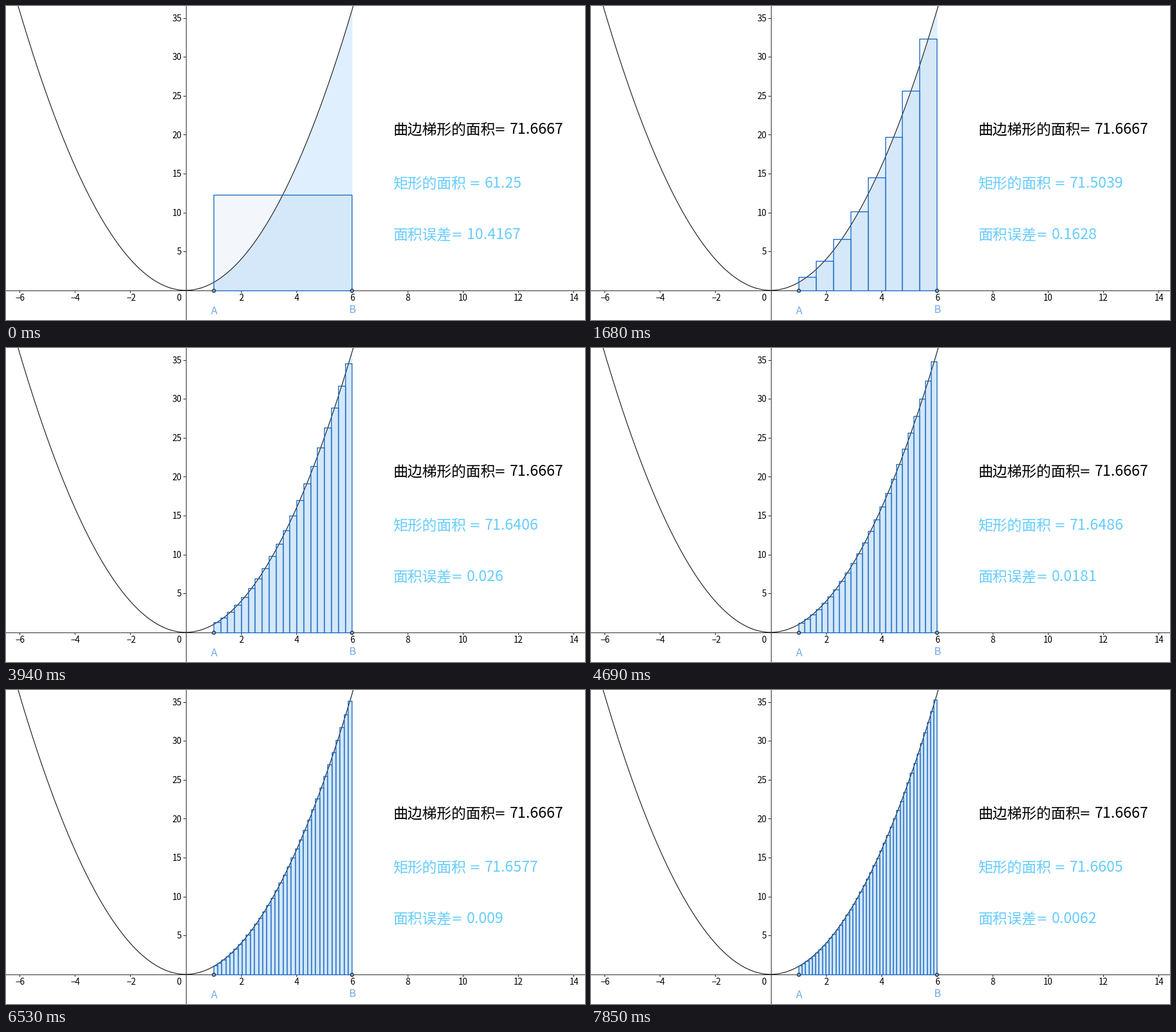
Animation, 901 px wide and 489 px high, one loop 8000 ms. Source, as a matplotlib script:

```python
import numpy as np
import matplotlib.pyplot as plt
from matplotlib.animation import FuncAnimation
from matplotlib.collections import PolyCollection

WIDTH, HEIGHT, DPI = 901, 489, 100
LOOP_MS, STEP_MS = 8000, 20
PX = 72 / DPI

X0, Y0 = 279.6, 442.8           # pixel position of the graph's zero point
X_UNIT, Y_UNIT = 43.13, 12.12   # pixels per unit
LOW, HIGH = 1, 6
EXACT = (HIGH**3 - LOW**3) / 3

BLUE, SKY, PALE = "#1565C0", "#66CCFF", "#DFEFFE"
FONT = "Noto Sans CJK JP"

# Moments at which one more rectangle is added.
CHANGES = np.array([
    500, 670, 920, 1090, 1260, 1510, 1680, 1840, 2010, 2260,
    2420, 2590, 2760, 2920, 3190, 3350, 3520, 3770, 3930, 4100,
    4350, 4520, 4690, 4860, 5020, 5180, 5450, 5610, 5780, 5950,
    6200, 6360, 6530, 6690, 6940, 7110, 7280, 7440, 7690, 7850])

# The small surplus keeps the pixel size from being rounded down.
fig = plt.figure(figsize=((WIDTH + 0.01) / DPI, (HEIGHT + 0.01) / DPI), dpi=DPI,
                 facecolor="white")
ax = fig.add_axes([0, 0, 1, 1])
ax.set_xlim(0, WIDTH)
ax.set_ylim(HEIGHT, 0)
ax.axis("off")


def px(x):
    return X0 + X_UNIT * x


def py(y):
    return Y0 - Y_UNIT * y


def line(xs, ys, color="#303030", width=1.0, z=3):
    ax.plot(xs, ys, color=color, lw=width * PX, zorder=z)


def write(x, y, text, size, color="black", ha="left", font=FONT):
    return ax.text(x, y, text, fontsize=size * PX, color=color, ha=ha,
                   va="baseline", family=font, zorder=6)


def draw_axes():
    line([0, WIDTH], [Y0, Y0])
    line([X0, X0], [0, HEIGHT])
    for x in range(-6, 15, 2):
        if x:
            line([px(x)] * 2, [Y0, Y0 + 3.5])
            shift = 1.2 if x < 0 else 0.6
            write(px(x) + shift, 459.3, str(x).replace("-", "\u2212"), 13.5, ha="center")
    write(269, 459.3, "0", 13.5, ha="center")
    for y in range(5, 36, 5):
        line([X0 - 3.5, X0], [py(y)] * 2)
        write(273.5, py(y) + 5.2, str(y), 13.5, ha="right")


def draw_curve():
    x = np.linspace(-6.3, 6.3, 400)
    line(px(x), py(x**2), "#222222", 1.2, 2)
    x = np.linspace(LOW, HIGH, 120)
    ax.fill_between(px(x), py(x**2), Y0, color=PALE, lw=0, zorder=1)


def draw_points():
    for x, name, label_x, base in ((LOW, "A", 323.8, 480), (HIGH, "B", 539.2, 478)):
        ax.plot(px(x), Y0, "o", ms=5 * PX, mfc="#7FAEDD", mec="#16212E",
                mew=1.2 * PX, zorder=5)
        write(label_x, base, name, 16.5, "#74A9E6", "center")


def readout(label, x, base, equals_x, value_x, color):
    write(x, base, label, 22.8, color)
    write(equals_x, base, "=", 21, color, "center", "DejaVu Sans")
    return write(value_x, base, "", 23.2, color)


def short(value):
    return f"{value:.4f}".rstrip("0").rstrip(".")


draw_axes()
draw_curve()
draw_points()
exact_text = readout("曲边梯形的面积", 602.5, 199.3, 769, 784, "black")
sum_text = readout("矩形的面积", 602.5, 283.3, 730, 745, SKY)
error_text = readout("面积误差", 602.8, 363.3, 702, 717, SKY)
exact_text.set_text(short(EXACT))

bars = PolyCollection([], facecolors=[(0.08, 0.4, 0.75, 0.05)], edgecolors=BLUE,
                      linewidths=1.3 * PX, zorder=4)
ax.add_collection(bars, autolim=False)


def update(frame):
    now = frame * STEP_MS + STEP_MS / 2
    count = 1 + np.searchsorted(CHANGES, now, side="right")
    edges = np.linspace(LOW, HIGH, count + 1)
    heights = ((edges[:-1] + edges[1:]) / 2) ** 2
    bars.set_verts([
        [(px(a), Y0), (px(a), py(h)), (px(b), py(h)), (px(b), Y0)]
        for a, b, h in zip(edges[:-1], edges[1:], heights)])
    total = heights.sum() * (HIGH - LOW) / count
    sum_text.set_text(short(total))
    error_text.set_text(short(EXACT - total))
    return bars, sum_text, error_text


animation = FuncAnimation(fig, update, frames=LOOP_MS // STEP_MS, interval=STEP_MS,
                          init_func=lambda: update(0), repeat=True, repeat_delay=0)
plt.show()
```
